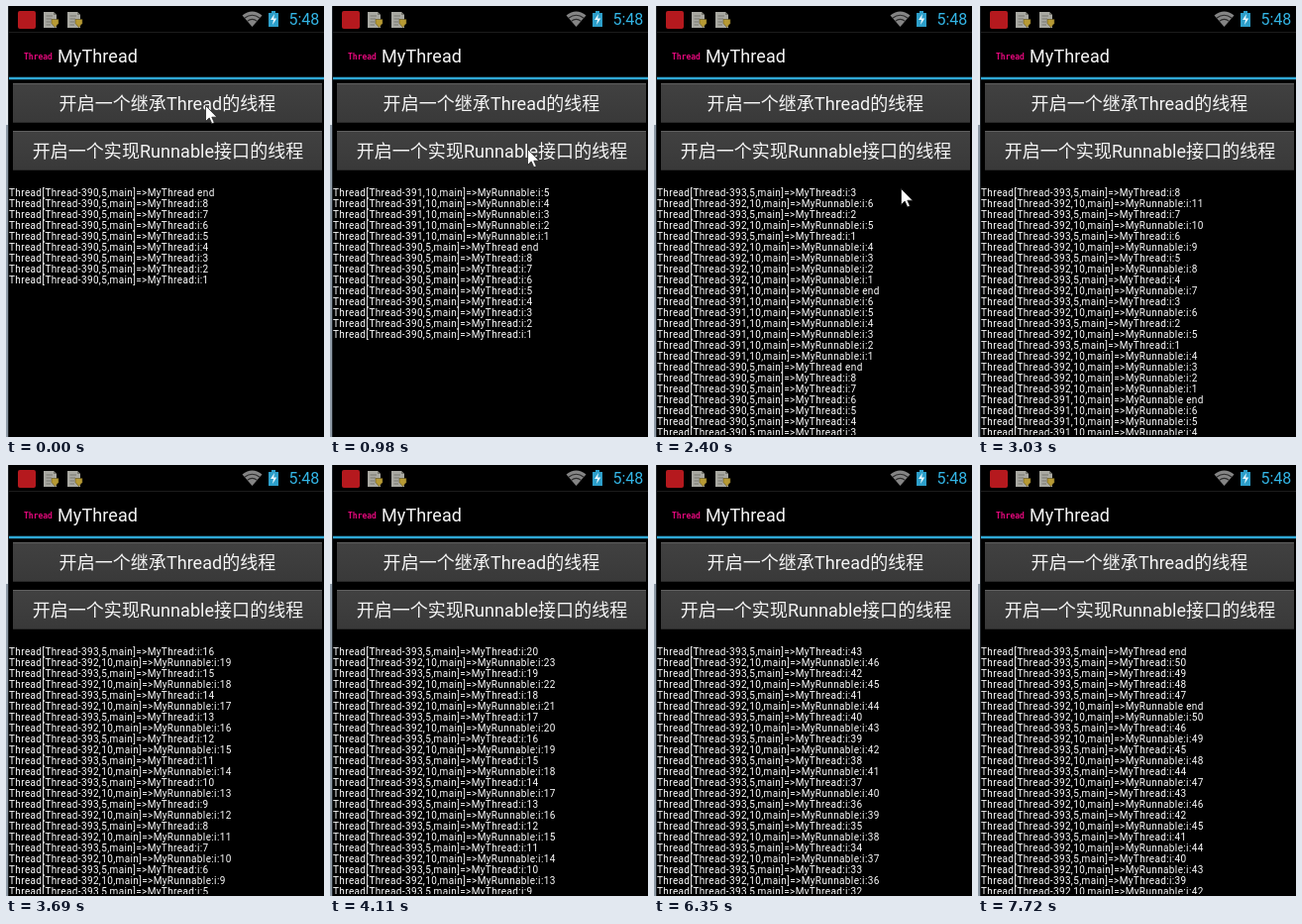
An HTML page that plays this animation: 321x435 px, repeating every 7.82 s.

```html
<!DOCTYPE html>
<html lang="zh">
<head>
<meta charset="utf-8">
<title>MyThread</title>
<style>
  html, body { margin: 0; width: 100%; height: 100%; overflow: hidden; background: #000; }
  svg { display: block; }
  text { font-family: Roboto, "Noto Sans CJK SC", "Noto Sans CJK", sans-serif; fill: #f5f5f5; white-space: pre; }
  .button { font-size: 18px; text-anchor: middle; letter-spacing: .05px; }
  .log text { font-size: 10px; letter-spacing: .37px; fill: #fff; }
</style>
</head>
<body>
<svg width="321" height="435" viewBox="0 0 321 435">
  <defs>
    <linearGradient id="face" x2="0" y2="1">
      <stop offset="0" stop-color="#414141"/>
      <stop offset="1" stop-color="#393939"/>
    </linearGradient>
    <clipPath id="view"><rect x="3" y="180" width="318" height="253"/></clipPath>
    <g id="download">
      <path d="M0 0H10L13 3V16H0Z" fill="#a9a9a2"/>
      <path d="M10 0V3H13Z" fill="#77776f"/>
      <path d="M2.5 4H9M2.5 7H8M2.5 10H7M2.5 13H7" stroke="#77776f"/>
      <path d="M8 7.5H15V11.5L11.5 15.5L8 11.5Z" fill="#b79a34" stroke="#5e511e" stroke-width=".6"/>
    </g>
    <g id="key">
      <rect width="312" height="40" rx="1" fill="url(#face)"/>
      <path d="M0 .5H312" stroke="#606060"/>
      <path d="M0 39.5H312" stroke="#292929"/>
    </g>
  </defs>
  <rect width="321" height="435"/>
  <rect width="2" height="435" fill="#8e9aa6"/>
  <rect width="2" height="120" fill="#e6ebf0"/>
  <rect x="2" width="1" height="435" fill="#20252a"/>
  <rect x="3" y="26" width="318" height="1" fill="#1c1c1c"/>

  <rect x="12" y="5" width="18" height="18" rx="2" fill="#b5191e"/>
  <use href="#download" x="38" y="6"/>
  <use href="#download" x="62" y="6"/>
  <path d="M248.5 21L238.5 9.5Q248.5 1.5 258.5 9.5Z" fill="#858585"/>
  <path d="M240.8 12.2Q248.5 6.2 256.2 12.2M243.5 15.4Q248.5 11.4 253.5 15.4" fill="none" stroke="#2b2b2b" stroke-width="1.1"/>
  <path d="M268 5H272V7H275V21H265V7H268Z" fill="#2d9fca"/>
  <path d="M271 8L267 14H270L269 19L273.3 12.5H270.2Z" fill="#e8f8ff"/>
  <text x="285.5" y="19" font-size="16" style="fill:#33b5e5">5:48</text>

  <text x="18" y="54" font-size="8" font-weight="bold" style="font-family:'DejaVu Sans Mono',monospace;fill:#e4087c">Thread</text>
  <text x="52" y="57" font-size="18" letter-spacing=".1">MyThread</text>
  <rect x="3" y="71" width="318" height="4" fill="#0d2c38"/>
  <rect x="3" y="72" width="318" height="2" fill="#2fa8d5"/>

  <use href="#key" x="7" y="78"/>
  <use href="#key" x="7" y="126"/>
  <text class="button" x="163" y="105">开启一个继承Thread的线程</text>
  <text class="button" x="163.5" y="153">开启一个实现Runnable接口的线程</text>

  <g class="log" clip-path="url(#view)"></g>
  <path id="cursor" d="M.5 .5V16.5L4.2 13L6.8 18.8L9.3 17.7L6.8 12.2H12Z" fill="#fff" stroke="#222" stroke-width=".8"/>
</svg>
<script>
const LOOP = 7820, ROWS = 23, REFRESH = 135.5, PERIOD = 97;
const logBox = document.querySelector('.log');
const cursor = document.getElementById('cursor');

// The screen refreshes in equal steps between these times
const marks = [0, 150, 1100, 1220, 1620, 1890, 2400, 3690, 4930, 6350, 7040];

function lastRefresh(t) {
  const k = marks.findLastIndex(m => m <= t);
  if (k === marks.length - 1) return marks[k];
  const gap = marks[k + 1] - marks[k];
  const step = gap / Math.round(gap / REFRESH);
  return marks[k] + Math.floor((t - marks[k]) / step) * step;
}

// Pointer stops: time, x, y
const stops = [
  [0, 201, 100], [150, 201, 100], [420, 201, 144], [1620, 197, 144],
  [1890, 197, 144], [2190, 210, 100], [2400, 249, 184], [2910, 299, 300]
];

function pointerAt(t) {
  const k = Math.max(1, stops.findIndex(s => s[0] >= t));
  const [a, b] = [stops[k - 1], stops[k]];
  const part = (t - a[0]) / (b[0] - a[0]);
  return [1, 2].map(c => Math.round(a[c] + (b[c] - a[c]) * part));
}

const events = [];

// Logs a thread that counts once per period, then its end line
function run(id, name, count, start) {
  const head = `Thread[Thread-${id},${name === 'MyThread' ? 5 : 10},main]=>${name}`;
  const timeOf = i => start + PERIOD * i;
  for (let i = 1; i <= count; i++) events.push([timeOf(i), `${head}:i:${i}`]);
  events.push([timeOf(count) + 1, `${head} end`]);
}
run(390, 'MyThread', 8, -1000);
run(391, 'MyRunnable', 6, 450);
run(392, 'MyRunnable', 50, 1813);
run(393, 'MyThread', 50, 2109);
events.sort((a, b) => a[0] - b[0]);

const rows = Array.from({ length: ROWS }, (_, k) => {
  const row = document.createElementNS('http://www.w3.org/2000/svg', 'text');
  row.setAttribute('x', 3);
  row.setAttribute('y', 192 + 11 * k);
  return logBox.appendChild(row);
});

function draw(t) {
  const lines = events.filter(e => e[0] <= t).reverse();
  rows.forEach((row, k) => row.textContent = lines[k] ? lines[k][1] : '');
  const visible = t <= stops.at(-1)[0];
  cursor.style.display = visible ? '' : 'none';
  if (visible) cursor.setAttribute('transform', `translate(${pointerAt(t)})`);
}

let shown = -1;
const start = performance.now();
function frame() {
  const time = lastRefresh((performance.now() - start) % LOOP);
  if (time !== shown) draw(shown = time);
  requestAnimationFrame(frame);
}
frame();
</script>
</body>
</html>
```
